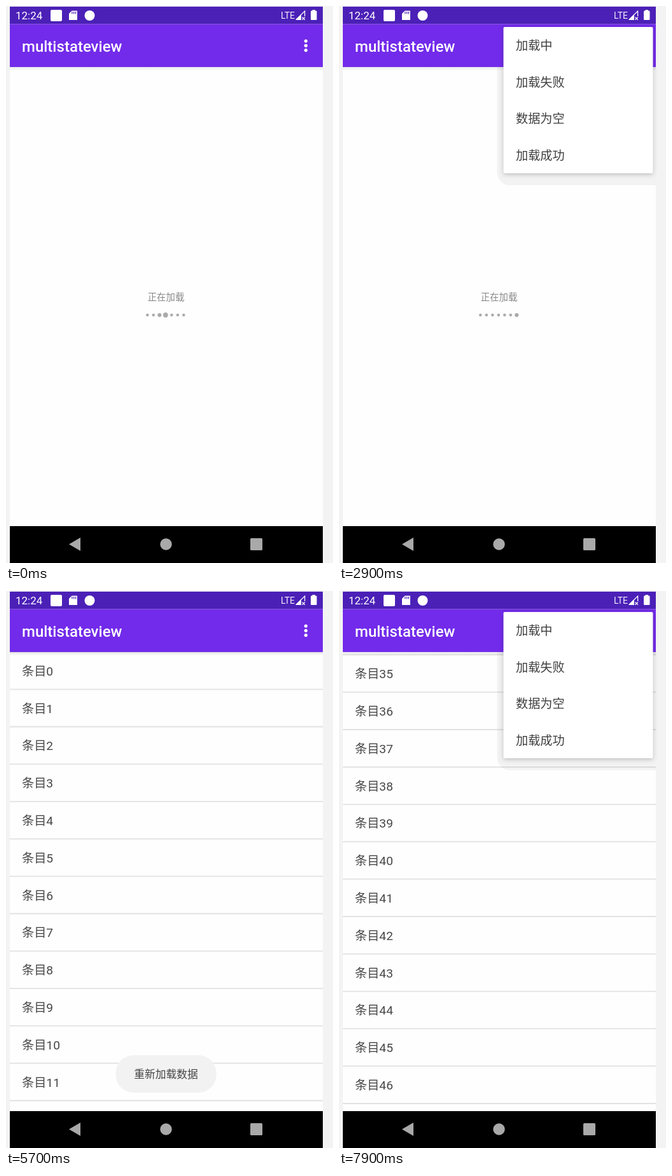
Write an HTML page with a canvas that moves like this. It is 514 px wide and 876 px high and loops after 8000 ms.

```html
<!DOCTYPE html>
<html lang="zh-CN">
<head>
<meta charset="utf-8">
<title>multistateview</title>
<style>
  html, body { margin: 0; width: 100%; height: 100%; overflow: hidden; background: #f3f3f3; }
  canvas { display: block; }
</style>
</head>
<body>
<canvas id="stage" width="514" height="876"></canvas>
<script>
const ctx = document.getElementById('stage').getContext('2d');
const FONT = 'Roboto, "Noto Sans CJK SC", "Noto Sans CJK", sans-serif';
const LOOP = 8000, STEP = 100;
const LEFT = 6, RIGHT = 498, TOP = 96, BOTTOM = 818;
const PURPLE = '#722bea';
const MENU = { x: 258.5, y: 33, w: 235, h: 230 };
const MENU_ITEMS = ['加载中', '加载失败', '数据为空', '加载成功'];
const ROW = 58.8, ROWS = 100, SCROLL_END = 2053.5;

const clamp = v => Math.max(0, Math.min(1, v));
const span = (t, a, b) => clamp((t - a) / (b - a));

function rect(x, y, w, h, color, r = 0) {
  ctx.fillStyle = color;
  ctx.beginPath();
  ctx.roundRect(x, y, w, h, r);
  ctx.fill();
}

function dot(x, y, r, color) {
  ctx.fillStyle = color;
  ctx.beginPath();
  ctx.arc(x, y, r, 0, Math.PI * 2);
  ctx.fill();
}

function poly(points, color) {
  ctx.fillStyle = color;
  ctx.beginPath();
  points.forEach(([x, y]) => ctx.lineTo(x, y));
  ctx.closePath();
  ctx.fill();
}

function text(str, x, y, size, color, align = 'left', weight = 400) {
  ctx.font = `${weight} ${size}px ${FONT}`;
  ctx.textAlign = align;
  ctx.fillStyle = color;
  ctx.fillText(str, x, y);
}

function clipped(x, y, w, h, draw) {
  ctx.save();
  ctx.beginPath();
  ctx.rect(x, y, w, h);
  ctx.clip();
  draw();
  ctx.restore();
}

function statusBar() {
  rect(LEFT, 1, RIGHT - LEFT, 27.5, '#4b20b7');
  text('12:24', 15, 21, 17, '#fff');
  rect(70, 6, 18, 18, '#fff', 2);
  poly([[103.5, 7.5], [112, 7.5], [112, 22], [99, 22], [99, 12]], '#fff');
  for (let i = 0; i < 3; i++) rect(103.3 + i * 2.8, 9, 1.3, 3.5, '#4b20b7');
  dot(131.5, 15, 8, '#fff');
  text('LTE', 432, 19.5, 14, '#f4f0fc');
  poly([[455, 22], [464, 13], [464, 22]], '#fff');
  ctx.strokeStyle = '#fff';
  ctx.lineWidth = 1.3;
  ctx.beginPath();
  ctx.moveTo(456, 21.4);
  ctx.lineTo(469.6, 8);
  ctx.lineTo(469.6, 16);
  ctx.moveTo(465.5, 17.5);
  ctx.lineTo(469.8, 21.8);
  ctx.moveTo(469.8, 17.5);
  ctx.lineTo(465.5, 21.8);
  ctx.stroke();
  rect(479, 7.5, 9.5, 14.5, '#fff', 1);
  rect(481.5, 6, 4.5, 2, '#fff');
}

function toolbar() {
  const shade = ctx.createLinearGradient(0, TOP, 0, TOP + 5);
  shade.addColorStop(0, 'rgba(0,0,0,.075)');
  shade.addColorStop(1, 'rgba(0,0,0,.03)');
  rect(LEFT, TOP, RIGHT - LEFT, 4.5, shade);
  rect(LEFT, 28.5, RIGHT - LEFT, TOP - 28.5, PURPLE);
  text('multistateview', 25, 71.5, 24, '#fff', 'left', 500);
  overflowDots();
}

function overflowDots() {
  for (const y of [55, 62.3, 69.6]) dot(471.3, y, 2.6, '#fff');
}

function navBar() {
  rect(LEFT, BOTTOM, RIGHT - LEFT, 58, '#000');
  poly([[99, 846.5], [117, 836], [117, 857]], '#a9a9a9');
  dot(251.5, 846.5, 9.2, '#a9a9a9');
  rect(384, 837, 19, 19, '#a9a9a9', 1.5);
}

// Eight beats: a large dot with a smaller trail runs along seven dots.
function loading(beat) {
  text('正在加载', 251.5, 462.5, 14.4, '#878787', 'center');
  const head = beat % 8;
  for (let i = 0; i < 7; i++) {
    const r = i === head ? 3.9 : i === head - 1 ? 3.1 : 2.3;
    dot(222.3 + i * 9.5, 486, r, '#ababab');
  }
}

function errorPage() {
  const red = ctx.createLinearGradient(235, 396, 268, 432);
  red.addColorStop(0, '#f0776a');
  red.addColorStop(0.45, '#dc3540');
  red.addColorStop(1, '#cf2438');
  poly([[232.5, 398], [244, 396], [254, 407], [267.5, 394.5], [273, 402], [261, 413],
        [271, 433], [253.5, 420], [237, 431.5], [247, 414]], red);
  ctx.strokeStyle = '#686868';
  ctx.lineWidth = 2;
  ctx.lineJoin = 'round';
  ctx.stroke();
  text('加载错误', 251.5, 462, 21.55, '#8c8c8c', 'center');
  text('重试', 251.5, 502.5, 16.8, '#3c3c3c', 'center');
}

function scrollAt(t) {
  if (t < 6400) return 498.7 * span(t, 6100, 6400) ** 2.5;
  const rest = 1 - span(t, 6400, 6900);
  return SCROLL_END - (SCROLL_END - 498.7) * rest * rest;
}

function list(t) {
  const scroll = scrollAt(t), view = BOTTOM - TOP;
  const first = Math.floor(scroll / ROW);
  for (let i = first; i < first + 14; i++) {
    const y = TOP + i * ROW - scroll;
    text('条目' + i, 25, y + 36.7, 19.2, '#474747');
    rect(LEFT, y - 1, RIGHT - LEFT, 1.8, '#e2e2e2');
  }
  const alpha = t < 6200 ? 0 : 1 - span(t, 7250, 7500);
  const total = ROWS * ROW;
  rect(492, TOP + scroll / total * view, 6, view / total * view, `rgba(0,0,0,${0.225 * alpha})`);
}

function toast(t) {
  const alpha = Math.min(span(t, 4625, 4725), 1 - span(t, 6600, 6850));
  if (!alpha) return;
  ctx.globalAlpha = alpha;
  rect(172.5, 730, 158, 59, '#f2f2f2', 28);
  text('重新加载数据', 251.5, 766, 16.8, '#444', 'center');
  ctx.globalAlpha = 1;
}

function menuItems(dx, dy) {
  MENU_ITEMS.forEach((item, i) => text(item, 278 + dx, 69.3 + dy + i * 57.4, 19.2, '#3f3f3f'));
}

// Grows from the top right corner while its content slides half as far.
function openMenu(t, start) {
  const p = 1 - (1 - span(t, start, start + 250)) ** 2.3;
  const w = MENU.w * p, h = MENU.h * p;
  const x = MENU.x + MENU.w - w, y = MENU.y;
  ctx.globalAlpha = span(t, start, start + 80);
  clipped(LEFT, TOP, RIGHT - LEFT, BOTTOM - TOP, () =>
    rect(x - 10, y, 300, h + 19, 'rgba(0,0,0,.045)', 20));
  ctx.save();
  ctx.shadowColor = 'rgba(0,0,0,.22)';
  ctx.shadowBlur = 7;
  ctx.shadowOffsetY = 2;
  rect(x, y, w, h, '#fff', 2);
  ctx.restore();
  clipped(x, y, w, h, () => menuItems(MENU.w / 2 * (1 - p), -MENU.h / 2 * (1 - p)));
  ctx.globalAlpha = 1;
}

function closeMenu(t) {
  const alpha = 1 - span(t, 3290, 3430);
  if (!alpha) return;
  clipped(LEFT, TOP, RIGHT - LEFT, 300, () => rect(258, 60, 239, 208, 'rgba(0,0,0,.06)', 8));
  ctx.globalAlpha = alpha;
  rect(MENU.x, MENU.y, MENU.w, MENU.h, '#fff', 2);
  menuItems(0, 0.5);
  ctx.globalAlpha = 1;
  if (alpha < 0.5) overflowDots();
}

function page(t) {
  if (t < 3300) loading(3 + Math.floor(t / 105 + 0.55));
  else if (t < 4500) errorPage();
  else if (t < 5500) loading(Math.floor((t - 4500) / 105 + 0.3));
  else list(t);
}

function draw(t) {
  rect(0, 0, 514, 876, '#f3f3f3');
  rect(LEFT, TOP, RIGHT - LEFT, BOTTOM - TOP, '#fefefe');
  clipped(LEFT, TOP, RIGHT - LEFT, BOTTOM - TOP, () => page(t));
  statusBar();
  toolbar();
  navBar();
  toast(t);
  if (t > 1820 && t < 3300) openMenu(t, 1820);
  else if (t >= 3300 && t < 3500) closeMenu(t);
  else if (t > 7600) openMenu(t, 7600);
}

const begin = performance.now();
function tick() {
  const t = (performance.now() - begin) % LOOP;
  draw(Math.floor(t / STEP) * STEP);
  requestAnimationFrame(tick);
}
tick();
</script>
</body>
</html>
```
